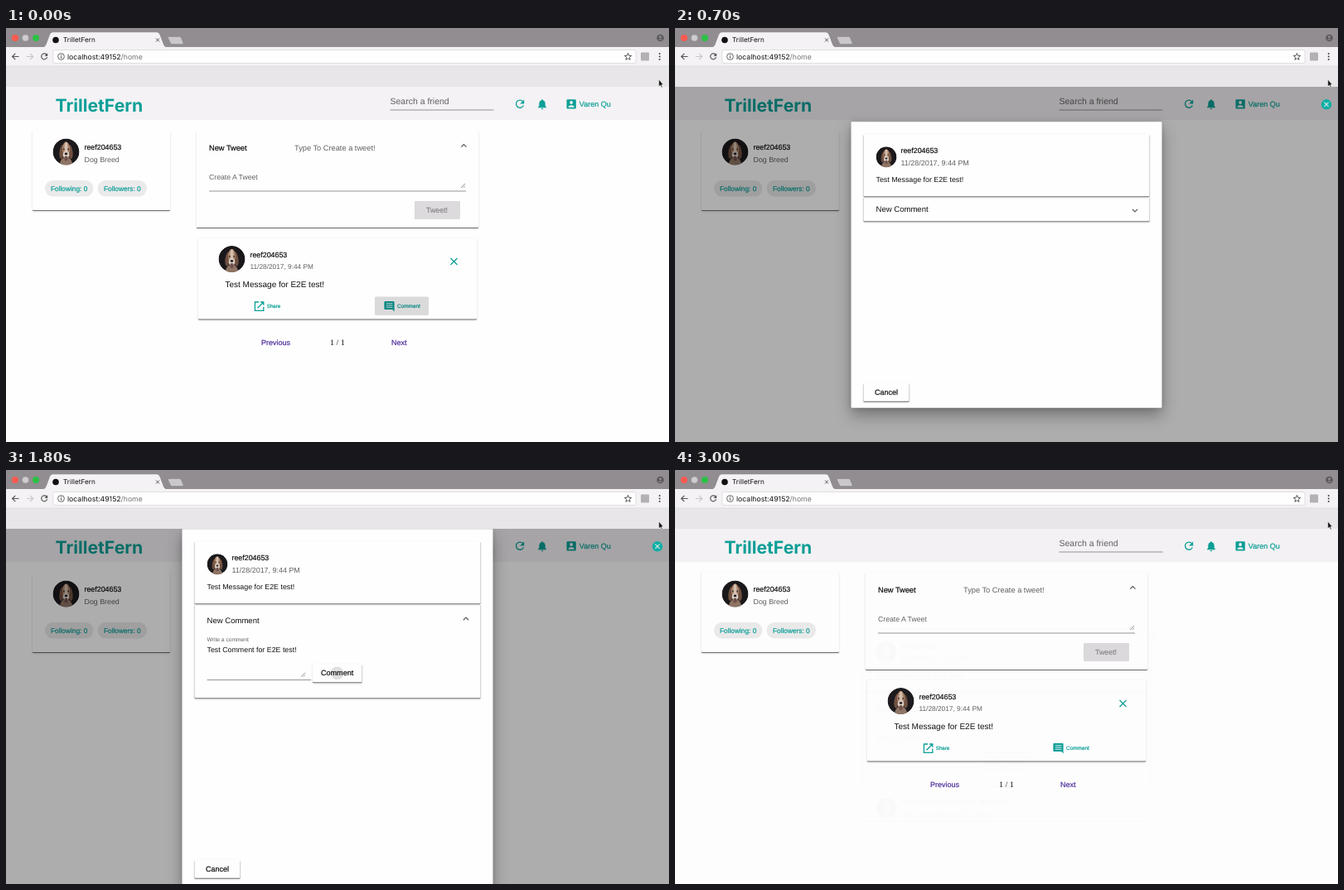
An HTML page for the animation above (3100 ms loop, 800 px wide and 500 px high).

```html
<!DOCTYPE html>
<html lang="en">
<head>
<meta charset="utf-8">
<title>Comment dialog</title>
<style>
  html, body { margin: 0; width: 100%; height: 100%; overflow: hidden; background: #fffeff; }
  svg { display: block; }
  text { font-family: "Liberation Sans", Arial, sans-serif; font-size: 8.85px; fill: currentColor;
         color: #111; text-rendering: geometricPrecision; white-space: pre; }
  .ui { font-family: Inter, Roboto, sans-serif; }
  .m { stroke: currentColor; stroke-width: .22; }
  .gray { color: #616061; }
  .teal { color: #0b9f97; }
  .violet { color: #4b2a9b; }
  .off { color: #8a888a; }
  .s9 { font-size: 9px; }
  .line { fill: none; stroke: #555; stroke-width: 1.2; }
  .tl { fill: none; stroke: #0b9f97; stroke-width: 1.3; }
  .tf { fill: #0b9f97; }
  .rule { fill: none; stroke: #8a888a; stroke-width: .9; }
  .card { fill: #fffeff; filter: drop-shadow(0 1px .6px rgba(0,0,0,.5)) drop-shadow(0 1px .8px rgba(0,0,0,.16)); }
  .sheet { fill: #fffeff; filter: drop-shadow(0 0 3px rgba(0,0,0,.15)) drop-shadow(0 9px 9px rgba(0,0,0,.32)); }
  .flat { fill: #dcdadc; }
</style>
</head>
<body>
<svg id="stage" width="800" height="500" viewBox="0 0 800 500">
  <defs>
    <clipPath id="view"><rect y="71" width="800" height="429"/></clipPath>
    <clipPath id="round"><circle r="16"/></clipPath>
    <clipPath id="postBtn"><rect x="445" y="324.5" width="65" height="22.5" rx="1.5"/></clipPath>
    <clipPath id="fold"><rect id="foldBox" x="225" y="91" width="350" height="29"/></clipPath>
    <g id="dog" clip-path="url(#round)">
      <circle r="16" fill="#1b181b"/>
      <path d="M-8 17Q-7 7 0 6Q7 7 8 17Z" fill="#8f7464"/>
      <ellipse cx="-5" cy="0" rx="3" ry="8.5" fill="#6f5040" transform="rotate(8 -5 0)"/>
      <ellipse cx="5" cy="0" rx="3" ry="8.5" fill="#6f5040" transform="rotate(-8 5 0)"/>
      <ellipse cy="-3.5" rx="4.6" ry="8.5" fill="#a98268"/>
      <ellipse cy="-5" rx="2" ry="7" fill="#d5bfae"/>
      <ellipse cy="3.5" rx="3.8" ry="4.6" fill="#ddd0c6"/>
      <ellipse cy="8" rx="2.2" ry="3" fill="#70504b"/>
      <ellipse cy="2.4" rx="1.8" ry="1.4" fill="#211a1c"/>
      <circle cx="-2.7" cy="-3.2" r=".9" fill="#211a1c"/>
      <circle cx="2.7" cy="-3.2" r=".9" fill="#211a1c"/>
    </g>
    <path id="grip" d="M-2.5 2.5L2.5 -2.5M.2 2.5L2.5 .2" fill="none" stroke="#777" stroke-width=".8"/>
  </defs>

  <g id="page" clip-path="url(#view)">
    <rect y="71" width="800" height="429" fill="#fffeff"/>
    <rect y="71" width="800" height="40" fill="#f4f2f4"/>
    <text class="ui teal" x="59.5" y="100.8" style="font-size:21.2px;font-weight:700">TrilletFern</text>
    <text class="gray" x="463.5" y="92.2" style="font-size:10.5px">Search a friend</text>
    <path class="rule" d="M463.5 99H588.5"/>
    <path class="tl" d="M623.6 88.6A4.6 4.6 0 1 0 624.4 93.4"/>
    <path class="tf" d="M625.2 86.6V91.6H620.2Z"/>
    <path class="tf" d="M642 96.3V95.4L643.3 94.2V90.8Q643.4 87.9 646 87.3Q646 86.2 647 86.2T648 87.3Q650.6 87.9 650.7 90.8V94.2L652 95.4V96.3ZM645.7 97H648.3Q648.2 98.3 647 98.3T645.7 97Z"/>
    <rect class="tf" x="676.5" y="86.2" width="11.3" height="11.3" rx="1.2"/>
    <circle cx="682.1" cy="90" r="1.9" fill="#f4f2f4"/>
    <path d="M678.4 95.8Q678.6 93.2 682.1 93.2T685.8 95.8Z" fill="#f4f2f4"/>
    <text class="m teal s9" x="691.8" y="95.2">Varen Qu</text>

    <rect class="card" x="32" y="124" width="166" height="96" rx="1"/>
    <use href="#dog" transform="translate(72.5 149.5)"/>
    <text class="m" x="94.5" y="147">reef204653</text>
    <text class="gray" x="94.5" y="162">Dog Breed</text>
    <rect x="47" y="184" width="58.5" height="19.5" rx="9.75" fill="#ebeaeb"/>
    <rect x="110.5" y="184" width="59.5" height="19.5" rx="9.75" fill="#ebeaeb"/>
    <text class="m teal" x="54" y="196.5" style="font-size:8.3px">Following: 0</text>
    <text class="m teal" x="118" y="196.5" style="font-size:8.3px">Followers: 0</text>

    <rect class="card" x="230" y="124" width="340" height="117" rx="1"/>
    <text class="m" x="245" y="147.5" style="font-size:9.25px">New Tweet</text>
    <text class="gray" x="348" y="147.5" style="font-size:9.25px">Type To Create a tweet!</text>
    <path class="line" d="M549.3 143.6L552.4 140.5L555.5 143.6"/>
    <text class="gray" x="245" y="182.7" style="font-size:8.7px">Create A Tweet</text>
    <path class="rule" d="M245 197H555"/>
    <use href="#grip" x="551.5" y="190.5"/>
    <rect class="flat" x="493" y="209" width="55" height="22" rx="1.2"/>
    <text class="m off" x="507" y="223.2">Tweet!</text>

    <rect class="card" x="232" y="253.5" width="336" height="98" rx="1"/>
    <use href="#dog" transform="translate(272.5 279)"/>
    <text class="m" x="294.5" y="277">reef204653</text>
    <text class="gray" x="294.5" y="291.2" style="font-size:8.3px">11/28/2017, 9:44 PM</text>
    <text x="264.5" y="312.6" style="font-size:10px">Test Message for E2E test!</text>
    <path class="tl" d="M536.5 278L544.5 286M544.5 278L536.5 286"/>
    <path class="tl" d="M305 331H300.4V341.4H310.8V336.8M307 331H310.8V334.8M310.6 331.2L303.5 338.3"/>
    <text class="m teal" x="314.8" y="338.2" style="font-size:6.2px">Share</text>
    <path class="tf" d="M457.5 330H467.5Q468.6 330 468.6 331.1V342.4L466.2 340H457.5Q456.4 340 456.4 338.9V331.1Q456.4 330 457.5 330Z"/>
    <path d="M458.8 332.7H466.4M458.8 335H466.4M458.8 337.3H466.4" stroke="#e8f4f3" stroke-width=".9"/>
    <text class="m teal" x="472" y="338.2" style="font-size:6.45px">Comment</text>
    <g clip-path="url(#postBtn)"><circle id="postInk" cx="477" cy="336" r="40"/></g>

    <text class="m violet s9" x="308" y="383.2">Previous</text>
    <text x="391" y="383.4" style="font-family:'Liberation Serif',serif;font-size:10px">1 / 1</text>
    <text class="m violet s9" x="465" y="383.2">Next</text>

    <rect id="shade" y="71" width="800" height="429"/>

    <g id="dialog">
      <rect id="sheet" class="sheet" x="212.5" width="375" height="345.5" rx="1.2"/>
      <g id="close">
        <circle r="6.2" fill="#10aea5"/>
        <path d="M-2.6 -2.6L2.6 2.6M2.6 -2.6L-2.6 2.6" stroke="#d9eeec" stroke-width="1.1"/>
      </g>
      <rect id="panel" class="card" x="227.5" y="91" width="345" height="29" rx="1"/>
      <rect class="card" x="227.5" y="15" width="345" height="75" rx="1"/>
      <use href="#dog" transform="translate(255 42.5) scale(.78)"/>
      <text class="m" x="272.5" y="38">reef204653</text>
      <text class="gray" x="272.5" y="53" style="font-size:8.95px">11/28/2017, 9:44 PM</text>
      <text x="242.5" y="73">Test Message for E2E test!</text>
      <text id="panelTitle" x="242.5" style="font-size:9.55px">New Comment</text>
      <path id="chevron" class="line" d="M-3.1 1.6L0 -1.5L3.1 1.6"/>
      <g id="form" clip-path="url(#fold)">
        <text id="label" x="242.5">Write a comment</text>
        <text id="typed" x="242.5" y="149"></text>
        <path class="rule" d="M242.5 182.3H368"/>
        <path id="focusLine" stroke="#5b35b5" stroke-width="1.4"/>
        <use href="#grip" x="358.5" y="176"/>
        <rect id="sendBox" x="370" y="163" width="59.5" height="22" rx="1.2"/>
        <circle id="sendInk" cx="399.5" cy="174"/>
        <text id="sendText" class="m" x="380" y="177.2" style="font-size:9.05px">Comment</text>
      </g>
      <g id="reply">
        <rect x="222" y="205.5" width="356" height="41" fill="#fffeff"/>
        <path d="M228 246.7H572.5" stroke="#8a888a" stroke-width="1.3"/>
        <use href="#dog" transform="translate(255 231) scale(.78)"/>
        <text x="272.5" y="226.8" style="font-size:8.9px">reef204653 11/28/2017, 9:44 PM</text>
        <text class="gray" x="272.5" y="241.6">Test Comment for E2E test!</text>
      </g>
      <g id="cancel">
        <rect class="card" x="227.5" y="-30" width="55" height="22" rx="1.2"/>
        <text class="m s9" x="241" y="-15.8">Cancel</text>
      </g>
    </g>
  </g>

  <g id="browser">
    <rect width="800" height="23" fill="#918d91"/>
    <rect y="23" width="800" height="23" fill="#f4f2f4"/>
    <rect y="46" width="800" height="25" fill="#e8e6e8"/>
    <path d="M0 46H800" stroke="#dcdadc" stroke-width=".7"/>
    <path d="M45 23.5Q47.5 22.5 48.5 20L53 8Q54 5.3 56.5 5.3H182Q184.5 5.3 185.5 8L190 20Q191 22.5 193.5 23.5Z" fill="#f4f2f4"/>
    <path d="M196.5 10.5H209.5Q211 10.5 211.5 12L214 18Q214.3 19.5 213 19.5H200.5Q199 19.5 198.3 18L195.5 12Q195 10.5 196.5 10.5Z" fill="#cbc8cb" stroke="#858185" stroke-width=".5"/>
    <circle cx="11" cy="12" r="4" fill="#fb5a50"/>
    <circle cx="23.5" cy="12" r="3.8" fill="#d0cdd0" stroke="#b3b0b3" stroke-width=".6"/>
    <circle cx="36" cy="12" r="4" fill="#2cc145"/>
    <circle cx="60" cy="14.5" r="3.8" fill="#111"/>
    <text class="ui" x="69" y="17.4" style="font-size:8.2px">TrilletFern</text>
    <path d="M181 12.5L185 16.5M185 12.5L181 16.5" stroke="#555" stroke-width="1"/>
    <circle cx="789.5" cy="12" r="4.3" fill="#5c595c"/>
    <circle cx="789.5" cy="10.8" r="1.5" fill="#918d91"/>
    <path d="M786.7 14.6Q789.5 11.8 792.3 14.6Z" fill="#918d91"/>
    <path class="line" d="M15.5 34.5H7.8M11.3 30.8L7.6 34.5L11.3 38.2"/>
    <path class="line" d="M24.8 34.5H32.5M29 30.8L32.7 34.5L29 38.2" style="stroke:#c9c7c9"/>
    <path class="line" d="M48.8 32A3.5 3.5 0 1 0 49.6 35.2"/>
    <path d="M50.2 30.3V34H46.5Z" fill="#555"/>
    <rect x="57" y="26.5" width="703" height="16" rx="2" fill="#fffeff" stroke="#d6d4d6" stroke-width=".7"/>
    <circle class="line" cx="66.5" cy="34.5" r="3.9" style="stroke-width:.9"/>
    <path d="M66.5 33.8V36.7M66.5 32V33" stroke="#555" stroke-width="1"/>
    <text class="ui" x="74" y="37.8" style="font-size:8.7px">localhost:49152<tspan fill="#757375">/home</tspan></text>
    <path id="star" class="line" style="stroke:#444;stroke-width:.9"/>
    <rect x="766" y="29.5" width="10" height="10" rx="1" fill="#b3b1b3"/>
    <g fill="#444"><circle cx="788.7" cy="31" r="1"/><circle cx="788.7" cy="34.5" r="1"/><circle cx="788.7" cy="38" r="1"/></g>
    <path d="M787.7 62V70.8L789.6 69.1L790.9 72L792.2 71.4L790.9 68.6H793.2Z" fill="#111" stroke="#fff" stroke-width=".6"/>
  </g>
</svg>
<script>
  const LOOP = 3100, TICK = 100, MIDDLE = 286;
  const COMMENT = 'Test Comment for E2E test!';
  const at = { shade: 120, open: 228, unfold: 800, focus: 1164, blur: 1690, send: 1771, posted: 2100, leave: 2700 };
  const el = id => document.getElementById(id);
  const set = (id, attrs) => { for (const k in attrs) el(id).setAttribute(k, attrs[k]); };
  const show = (id, on) => set(id, { visibility: on ? 'visible' : 'hidden' });

  function bezier(x1, y1, x2, y2) {
    const axis = (a, b, s) => 3 * (1 - s) ** 2 * s * a + 3 * (1 - s) * s * s * b + s ** 3;
    return x => {
      if (x <= 0) return 0;
      if (x >= 1) return 1;
      let lo = 0, hi = 1;
      for (let i = 0; i < 24; i++) {
        const mid = (lo + hi) / 2;
        if (axis(x1, x2, mid) < x) lo = mid; else hi = mid;
      }
      return axis(y1, y2, lo);
    };
  }
  const swift = bezier(.25, .8, .25, 1);
  const standard = bezier(.4, 0, .2, 1);
  const decel = bezier(0, 0, .2, 1);

  function drawDialog(t) {
    const enter = swift((t - at.open) / 400), exit = swift((t - at.leave) / 400);
    const unfold = standard((t - at.unfold) / 225);
    const height = 345.5 + 84 * unfold, top = MIDDLE - height / 2;
    const shift = height * .25 * (1 - enter + exit);
    const moving = enter < 1 || exit > 0;

    set('shade', { opacity: .32 * (swift((t - at.shade) / 400) - exit) });
    set('dialog', {
      opacity: enter * (1 - exit),
      transform: `translate(400 ${MIDDLE + shift}) scale(${.9 + .1 * enter}) translate(-400 ${-height / 2})`
    });
    set('sheet', { height });
    // The close icon is pinned to the dialog only while that is transformed.
    set('close', { transform: moving ? 'translate(573.5 21)' : `translate(786 ${92.3 - top})` });
    set('panel', { height: 29 + 84 * unfold });
    set('foldBox', { height: 29 + 84 * unfold });
    set('panelTitle', { y: 109 + 5 * unfold });
    set('chevron', { transform: `translate(555 ${107.2 + 1.2 * unfold}) rotate(${180 * (1 - unfold)})` });
    set('cancel', { transform: `translate(0 ${height})` });
    show('form', unfold > 0);
  }

  function drawForm(t) {
    const focused = t >= at.focus && t < at.blur, posted = t >= at.posted;
    const floated = t >= at.focus && !posted;
    const count = Math.max(0, Math.floor((t - at.focus - 2) / 16.7));
    const half = 62.75 * (.5 + .5 * swift((t - at.focus) / 300));
    const label = el('label');

    label.style.fontSize = floated ? '6.7px' : '8.85px';
    label.style.color = focused ? '#5b35b5' : '#616061';
    set('label', { y: floated ? 135.6 : 149 });
    el('typed').textContent = floated ? COMMENT.slice(0, count) + (focused ? '|' : '') : '';
    set('focusLine', { d: `M${305.25 - half} 182.6H${305.25 + half}`, opacity: focused ? 1 : 0 });

    const empty = posted || count === 0;
    set('sendBox', { class: empty ? 'flat' : 'card' });
    el('sendText').style.color = empty ? '#8a888a' : '#111';
    const ink = t >= at.send && !posted;
    set('sendInk', { r: 36 * decel((t - at.send) / 450), opacity: ink ? .12 : 0 });
    show('reply', posted);
  }

  function draw(ms) {
    const t = Math.floor(ms % LOOP / TICK) * TICK;
    set('postInk', { r: t < 300 ? 40 : 24, opacity: .14 * Math.max(0, Math.min(1, (600 - t) / 350)) });
    drawDialog(t);
    drawForm(t);
  }

  const points = Array.from({ length: 10 }, (_, i) => {
    const a = Math.PI * i / 5, r = i % 2 ? 1.9 : 4.4;
    return `${750.5 + r * Math.sin(a)} ${34.8 - r * Math.cos(a)}`;
  });
  set('star', { d: `M${points.join('L')}Z` });

  const start = performance.now();
  function loop() {
    draw(performance.now() - start);
    requestAnimationFrame(loop);
  }
  draw(0);
  requestAnimationFrame(loop);
</script>
</body>
</html>
```
